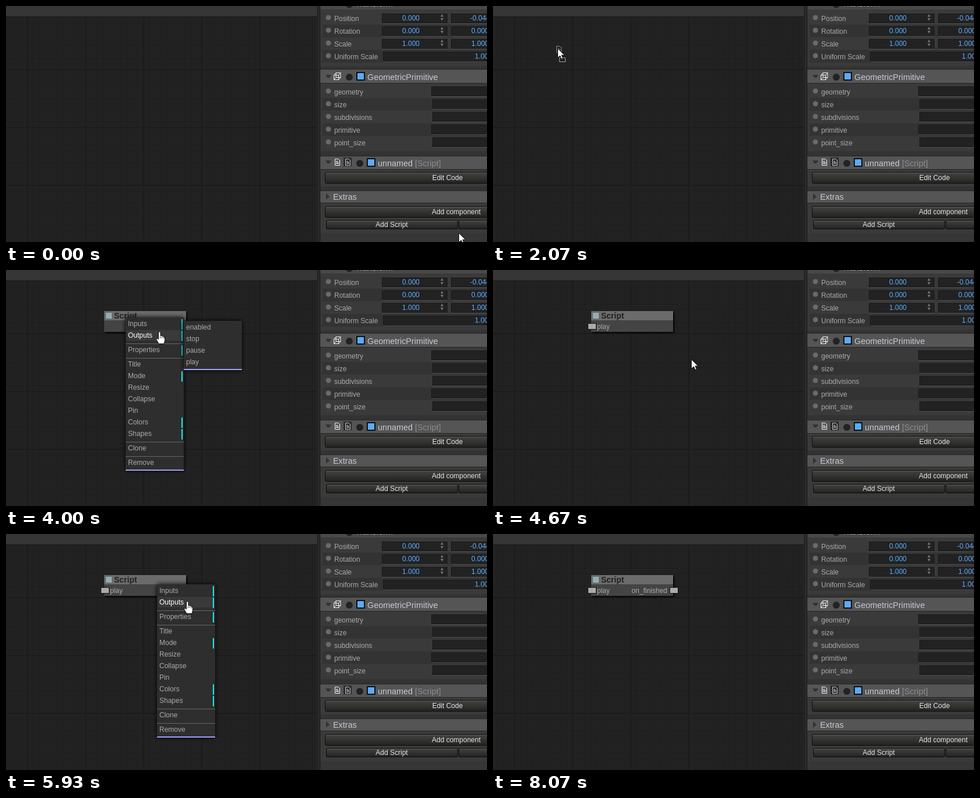
An HTML page with a canvas for the animation above (8990 ms loop, 828 by 408 pixels).

```html
<!DOCTYPE html>
<html lang="en">
<head>
<meta charset="utf-8">
<title>Script node</title>
<style>
html, body { margin: 0; width: 100%; height: 100%; overflow: hidden; background: #222; }
canvas { display: block; }
</style>
</head>
<body>
<canvas id="stage" width="828" height="408"></canvas>
<script>
const LOOP = 8990, STEP = 1000 / 15;
const c = document.getElementById('stage').getContext('2d', { alpha: false });

// Pointer path: time, x, y
const PATH = [
  [0, 779, 392], [733, 563, 269], [867, 546, 261], [933, 554, 258], [1000, 554, 258],
  [1200, 565, 258], [1400, 565, 258], [2067, 111, 73], [2267, 111, 73], [2533, 169, 87],
  [2933, 169, 87], [3133, 216, 92], [3333, 216, 92], [3667, 250, 98], [3867, 250, 98],
  [4400, 341, 154], [4667, 341, 154], [5333, 270, 97], [5467, 303, 104], [5533, 305, 105],
  [5733, 305, 105], [5933, 312, 117], [6133, 312, 117], [6533, 387, 150], [7533, 387, 150],
  [8067, 60, 412]
];
const NODE_MENU = ['Inputs>', 'Outputs>', '', 'Properties>', '', 'Title', 'Mode>', 'Resize',
  'Collapse', 'Pin', 'Colors>', 'Shapes>', '', 'Clone', '', 'Remove'];
const INPUTS = ['enabled', 'stop', 'pause', 'play'];
const OUTPUTS = ['on_start', 'on_update', 'on_finished'];
// Menus: open time, close time, x, y, items
const MENUS = [
  [3333, 4600, 206, 82, NODE_MENU], [3867, 4600, 306, 88, INPUTS],
  [5333, 7000, 260, 87, NODE_MENU], [6133, 7000, 360, 107, OUTPUTS]
];

function rect(x, y, w, h, color) {
  c.fillStyle = color;
  c.fillRect(x, y, w, h);
}

function text(s, x, y, color = '#aaa', align = 'left', font = '12px') {
  c.font = font + ' "Liberation Sans", Arial, sans-serif';
  c.textAlign = align;
  c.fillStyle = color;
  c.fillText(s, x, y);
}

function dot(x, y, r, color) {
  c.fillStyle = color;
  c.beginPath();
  c.arc(x, y, r, 0, 7);
  c.fill();
}

function shape(d, x, y, fill, stroke) {
  const p = new Path2D(d);
  c.save();
  c.translate(x, y);
  if (fill) { c.fillStyle = fill; c.fill(p); }
  if (stroke) { c.strokeStyle = stroke; c.lineWidth = 1; c.stroke(p); }
  c.restore();
}

function shadowed(blur, offset, draw) {
  c.save();
  c.shadowColor = '#000';
  c.shadowBlur = blur;
  c.shadowOffsetX = c.shadowOffsetY = offset;
  draw();
  c.restore();
}

function grid() {
  rect(0, 0, 537, 408, '#222');
  for (let x = 7; x < 537; x += 10) rect(x, 18, 1, 390, '#1f1f1f');
  for (let y = 19; y < 408; y += 10) rect(0, y, 537, 1, '#1f1f1f');
  for (let x = 36; x < 537; x += 100) rect(x, 18, 2, 390, '#1b1b1b');
  for (let y = 109; y < 408; y += 100) rect(0, y, 537, 2, '#1b1b1b');
  rect(0, 0, 537, 18, '#363636');
  rect(0, 18, 537, 1, '#1a1a1a');
}

function header(y, h) {
  rect(541, y - 1, 287, h + 2, '#262626');
  rect(541, y, 287, h, '#555');
}

function field(x, y, w) {
  rect(x, y, w, 17, '#1a1a1a');
  rect(x + 1, y + 1, w - 2, 15, '#222');
  rect(x, y + 17, w, 1, '#555');
}

function label(s, y, odd) {
  if (odd) rect(545, y - 12, 283, 22, '#333');
  dot(555, y - 2, 5, '#4a4a4a');
  dot(555, y - 2, 4, '#6b6b6b');
  text(s, 565, y + 4);
}

function number(s, x, y, w, tx) {
  field(x, y - 9, w);
  text(s, tx, y + 3, '#5aacff');
}

function button(s, x, y, w, h, cx) {
  const g = c.createLinearGradient(0, y, 0, y + h);
  g.addColorStop(0, '#454542');
  g.addColorStop(1, '#232321');
  c.fillStyle = g;
  c.strokeStyle = '#0c0c0c';
  c.lineWidth = 1;
  c.beginPath();
  c.roundRect(x + .5, y + .5, w, h, 2);
  c.fill();
  c.stroke();
  rect(x + 2, y + 1, w - 3, 1, '#5b5b57');
  text(s, cx, y + h / 2 + 4, '#e4e4e4', 'center');
}

function checkbox(x, y) {
  rect(x, y, 15, 15, '#111');
  rect(x + 2, y + 2, 11, 11, '#5aacff');
}

function page(x, y, color) {
  shape('M.5 .5H6L8.5 3V11.5H.5ZM2 4.5H5M2 6.5H7M2 8.5H7', x, y, null, color);
}

function panel() {
  rect(535, 0, 6, 408, '#2c2c2c');
  rect(536, 0, 1, 408, '#191919');
  rect(540, 0, 1, 408, '#151515');
  rect(541, 0, 287, 408, '#3a3a3a');
  rect(541, 0, 287, 6, '#484848');
  dot(591, -2, 5.5, '#222');
  text('Transform', 601, 1, '#bcc0cc', 'left', '14.4px');

  ['Position', 'Rotation', 'Scale', 'Uniform Scale'].forEach((s, i) => {
    const y = 22 + 22 * i, v = i == 2 ? '1.000' : '0.000';
    label(s, y, i % 2);
    if (i == 3) return number('1.000', 649, y, 190, 807);
    number(v, 647, y, 113, 682);
    shape('M0 -1.5L2.5 -6L5 -1.5ZM0 1L2.5 5.500L5 1Z', 748, y - 2, '#777');
    number(i ? v : '-0.044', 766, y, 113, i ? 801 : 799);
  });

  rect(541, 104, 287, 6, '#333');
  header(110, 23);
  shape('M0 0H10L7 5H3Z', 550, 119, '#333');
  shape('M.5 4.500H8.500V12.500H.5ZM.5 4.500L4 .5H12L8.500 4.500M12 .5V8.500L8.500 12.500M4 .5V8.500H12M4 8.500L.5 12.500', 564, 115, null, '#f0f0f0');
  dot(591, 123, 6, '#222');
  checkbox(603, 114);
  text('GeometricPrimitive', 622, 128, '#c5cad4', 'left', '14.4px');

  ['geometry', 'size', 'subdivisions', 'primitive', 'point_size'].forEach((s, i) => {
    const y = 149 + 22 * i;
    label(s, y, i % 2);
    field(i % 3 ? 734 : 732, y - 10, 110);
  });

  rect(541, 251, 287, 8, '#333');
  header(260, 22);
  shape('M0 0H10L7 5H3Z', 550, 267, '#333');
  page(566, 264, '#f4f4f4');
  rect(581, 262, 14, 15, '#2a2a2a');
  page(584, 264, '#c8c8c8');
  dot(609, 272, 6, '#222');
  checkbox(621, 263);
  text('unnamed', 640, 277, '#c5cad4', 'left', '14.4px');
  text('[Script]', 704, 277, '#8c8c8c', 'left', '14.4px');
  button('Edit Code', 549, 287, 290, 19, 760);

  rect(541, 312, 287, 7, '#333');
  header(320, 20);
  shape('M0 0L6 5.500L0 11Z', 551, 324, '#333');
  text('Extras', 563, 335, '#c5cad4', 'left', '14.4px');
  button('Add component', 549, 346, 290, 19, 775);
  button('Add Script', 551, 370, 226, 15, 664);
  button('', 779, 370, 60, 15, 800);
  rect(541, 393, 287, 15, '#363636');
}

function slot(x) {
  rect(x, 92, 15, 11, '#151515');
  rect(x + 1, 93, 13, 9, '#aaa');
}

function node(t) {
  shadowed(3, 2, () => rect(169, 71, 141, 36, '#444'));
  rect(169, 71, 141, 16, '#6b6b6b');
  rect(172, 74, 10, 10, '#91adb7');
  text('Script', 186, 84, '#222', 'left', 'bold 14px');
  if (t >= 4600) {
    slot(163);
    text('play', 179, 102);
  }
  if (t >= 7000) {
    slot(304);
    text('on_finished', 300, 102, '#aaa', 'right');
  }
}

function menu(x, y, items, px, py) {
  const h = items.reduce((sum, s) => sum + (s ? 20 : 5), 5);
  shadowed(8, 0, () => rect(x, y, 100, h, '#2e2e2e'));
  rect(x, y + h - 2, 100, 2, '#a0a0ff');
  let top = y + 1;
  for (const s of items) {
    if (!s) {
      rect(x, top + 4, 100, 1, '#666');
      top += 5;
      continue;
    }
    const hot = px >= x && px < x + 100 && py >= top && py < top + 20;
    if (hot) rect(x + 2, top + 1, 96, 18, '#3a3a3a');
    if (s.endsWith('>')) rect(x + 96, top + 2, 2, 18, '#1ee');
    text(s.replace('>', ''), x + 4, top + 14, hot ? '#fff' : '#aaa');
    top += 20;
  }
  return px >= x && px < x + 100 && py >= y && py < y + h;
}

function pointerAt(t) {
  const i = PATH.findIndex(p => p[0] > t);
  if (i < 0) return [60, 420];
  const [t0, x0, y0] = PATH[i - 1], [t1, x1, y1] = PATH[i];
  const k = (t - t0) / (t1 - t0), e = k * k * (3 - 2 * k);
  return [Math.round(x0 + (x1 - x0) * e), Math.round(y0 + (y1 - y0) * e)];
}

function pointer(kind, x, y) {
  if (kind == 'cross') {
    rect(x - 12, y - 1, 24, 2, '#b8b8b8');
    rect(x - 1, y - 12, 2, 24, '#b8b8b8');
  } else if (kind == 'hand') {
    shape('M-1.500 .5Q.5 -1 2 .5V7L4 6.500L5.500 8L7 7.500L8 9L9.500 9V15L8 20.500H-1L-5 13.500Q-5 10 -2.500 12L-1.500 13Z',
      x, y, '#fff', '#111');
    shape('M1.500 8V11M4.500 8.500V11M7.500 9V11.500', x, y, null, '#333');
  } else {
    shape('M.5 .5V16.500L4.500 13L7 18.500L9.500 17.500L7 12H12Z', x, y, '#fff', '#111');
  }
}

function draw(t) {
  const [x, y] = pointerAt(t);
  grid();
  if (t >= 2660) node(t);
  panel();
  let overMenu = false;
  for (const [from, to, mx, my, items] of MENUS)
    if (t >= from && t < to) overMenu = menu(mx, my, items, x, y) || overMenu;

  const dragging = t >= 1460 && t < 2660;
  const overNode = t >= 2660 && x > 169 && x < 310 && y > 71 && y < 107;
  if (dragging) {
    page(x - 2, y - 4, '#8c8c8c');
    c.save();
    c.setLineDash([2, 1]);
    shape('M3.500 16.500H13.500V23.500H3.500Z', x, y, '#222', '#ddd');
    c.restore();
  }
  pointer(overMenu ? 'hand' : overNode ? 'cross' : 'arrow', x, y);
}

function frame(now) {
  const t = now % LOOP;
  draw(Math.round(Math.floor((t + 4) / STEP) * STEP));
  requestAnimationFrame(frame);
}
requestAnimationFrame(frame);
</script>
</body>
</html>
```
